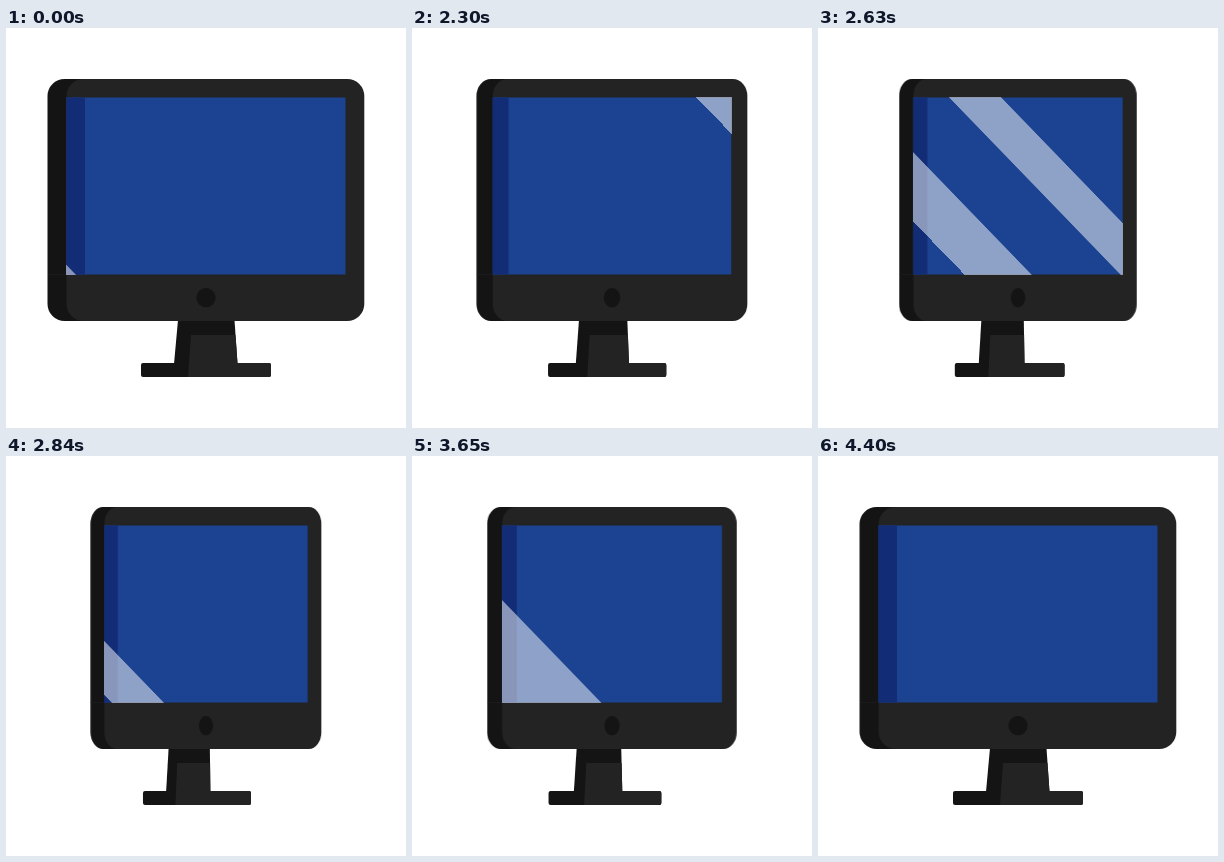
These frames come from a looping animation (400 by 400 pixels, 4.43 s). An HTML page without scripts:

```html
<!DOCTYPE html>
<html lang="en">
<head>
<meta charset="utf-8">
<title>Turning monitor</title>
<style>
  html, body { margin: 0; width: 100%; height: 100%; overflow: hidden; background: #fff; }
  svg { display: block; width: 100%; height: 100%; }

  .dark { fill: #141414; }
  .front { fill: #232323; }
  .screen { fill: #1c4391; }
  .shade { fill: #122c75; }
  .glare { fill: #fff; fill-opacity: .5; }

  .turn, .base, .neck, .panel, .sweep-left, .sweep-right {
    animation: 4.43s ease infinite;
  }
  .turn { transform-origin: 200px 0; animation-name: turn; }
  .base { animation-name: base; }
  .neck { animation-name: neck; }
  .panel { animation-name: panel; }
  .sweep-left { animation-name: sweep-left; animation-timing-function: linear; }
  .sweep-right { animation-name: sweep-right; animation-timing-function: linear; }

  /* Turn away at 45%, rest, turn back from 78.8%. */
  @keyframes turn {
    0%, 45%, 100% { transform: scaleX(1); }
    67.6%, 78.8% { transform: scaleX(.725); }
    78.8% { animation-timing-function: cubic-bezier(.27, .1, .28, 1); }
  }
  @keyframes base {
    0%, 45%, 100% { x: 135px; width: 130px; }
    67.6%, 78.8% { x: 137px; width: 107.7px; }
    78.8% { animation-timing-function: cubic-bezier(.27, .1, .28, 1); }
  }
  @keyframes neck {
    0%, 45%, 100% { d: path("M172 292 L228.5 292 L231.5 336 L168 336 Z"); }
    67.6%, 78.8% { d: path("M162.5 292 L203.5 292 L204 336 L160 336 Z"); }
    78.8% { animation-timing-function: cubic-bezier(.27, .1, .28, 1); }
  }
  @keyframes panel {
    0%, 45%, 100% { d: path("M185 307 L229.5 307 L231.5 335 L263 335 Q265 335 265 337 L265 347 Q265 349 263 349 L182 349 Z"); }
    67.6%, 78.8% { d: path("M171 307 L203.7 307 L204 335 L243 335 Q244.7 335 244.7 337 L244.7 347 Q244.7 349 243 349 L169.2 349 Z"); }
    78.8% { animation-timing-function: cubic-bezier(.27, .1, .28, 1); }
  }
  @keyframes sweep-left {
    0%, 45% { transform: translateX(573px); }
    67.6%, 100% { transform: translateX(-365px); }
  }
  @keyframes sweep-right {
    0%, 78.8% { transform: translateX(-241px); }
    100% { transform: translateX(459px); }
  }
</style>
</head>
<body>
<svg viewBox="0 0 400 400">
  <clipPath id="glass">
    <rect class="turn" x="60.5" y="69.5" width="279" height="177"/>
  </clipPath>

  <rect class="base dark" x="135" y="335" width="130" height="14" rx="2"/>
  <path class="neck dark" d="M172 292 L228.5 292 L231.5 336 L168 336 Z"/>
  <path class="panel front" d="M185 307 L229.5 307 L231.5 335 L263 335 Q265 335 265 337 L265 347 Q265 349 263 349 L182 349 Z"/>

  <g class="turn">
    <rect class="dark" x="41.5" y="51" width="80" height="242" rx="17"/>
    <rect class="front" x="60.5" y="51" width="297.8" height="242" rx="17"/>
    <rect x="42" y="246" width="18.5" height="1" fill="#1a1a1a"/>
    <rect class="screen" x="60.5" y="69.5" width="279" height="177"/>
    <rect class="shade" x="60.5" y="69.5" width="18.5" height="177"/>
    <circle class="dark" cx="200" cy="269.7" r="9.6"/>
  </g>

  <g clip-path="url(#glass)">
    <g class="glare" transform="matrix(1 0 .967 1 -67.7 0)">
      <g class="sweep-left">
        <rect y="60" width="67" height="200"/>
        <rect x="156" y="60" width="52" height="200"/>
      </g>
      <rect class="sweep-right" y="60" width="140" height="200"/>
    </g>
  </g>
</svg>
</body>
</html>
```
